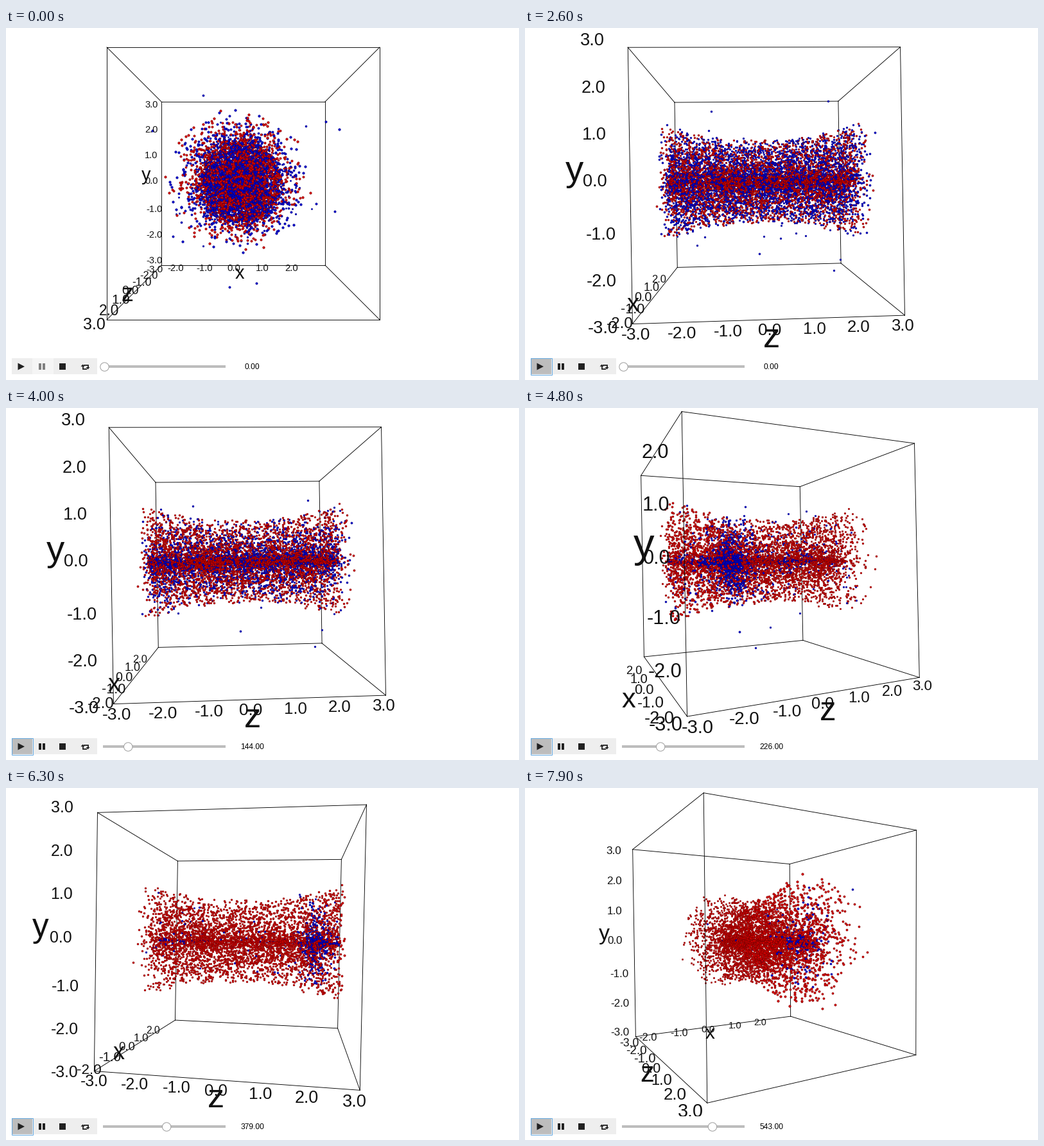
These frames come from a looping animation (799 by 549 pixels, 8 s). A matplotlib script:

```python
import itertools

import numpy as np
import matplotlib.pyplot as plt
from matplotlib.animation import FuncAnimation
from matplotlib.patches import Circle, Polygon, Rectangle

W, H, DPI = 799, 549, 100
STEP, FRAMES = 100, 80
PT = 72 / DPI                  # points per pixel
FOCAL, DIST = 637.5, 2.0
CX, CY = 369, 242
SLABS = 14
N = 4500
HALF_Z = 0.46
FONT = "Liberation Sans"
INK, DARK = "#111111", "#212121"

# Camera key poses: yaw, pitch, roll in degrees
FRONT = (0, 0, 0)
SIDE = (92.6, 0, 0.95)
POSES = {700: FRONT, 1200: (82, -0.7, 0.8), 1500: SIDE, 4450: SIDE,
         5300: (144.3, -0.9, 1.25), 6300: (81.4, 0.9, -1.05),
         7000: (70, 1, -0.6), 7900: (30, 1.5, 0.45)}


def smooth(x):
    x = np.clip(x, 0, 1)
    return x * x * (3 - 2 * x)


def counter(t):
    return round(np.interp(t, [2700, 4000, 7900], [0, 144, 543]))


# ---------- particles ----------
rng = np.random.default_rng(7)


def beam():
    u = rng.uniform(-1, 1, N)
    return u, 0.2 + 0.08 * u ** 2, rng.uniform(0, 1, N), \
        rng.uniform(0, 2 * np.pi, N)


def to_xyz(z, r, angle):
    return np.column_stack([r * np.cos(angle) - 0.02,
                            r * np.sin(angle) + 0.01, z])


red_u, red_limit, red_q, red_a = beam()
RED = to_xyz(red_u * HALF_Z, red_limit * red_q, red_a)
blue_u, blue_limit, blue_q, blue_a = beam()
strays = rng.uniform(0, 1, N) < 0.03
blue_limit[strays] *= rng.uniform(1.2, 1.9, strays.sum())
jitter = rng.normal(0, 0.028, N)


def blue_cloud(count):
    """Shrink to the axis, then bunch up and drift round the end of z."""
    late = max(count - 144, 0)
    r = blue_limit * blue_q ** (1 + min(count / 70, 3))
    z = HALF_Z * blue_u * np.abs(blue_u) ** (late / 25)
    z = z + jitter * smooth(late / 100) - 0.57 * smooth(late / 226)
    z = (z + HALF_Z) % (2 * HALF_Z) - HALF_Z
    return to_xyz(z, r, blue_a)[:int(N * np.exp(-late / 150))]


# ---------- camera ----------
def rotation(t):
    angles = [np.interp(t, list(POSES), a) for a in zip(*POSES.values())]
    ca, cp, cr = np.cos(np.radians(angles))
    sa, sp, sr = np.sin(np.radians(angles))
    ry = np.array([[ca, 0, sa], [0, 1, 0], [-sa, 0, ca]])
    rx = np.array([[1, 0, 0], [0, cp, -sp], [0, sp, cp]])
    rz = np.array([[cr, -sr, 0], [sr, cr, 0], [0, 0, 1]])
    return rz @ rx @ ry


def project(points, rot):
    cam = np.atleast_2d(points) @ rot.T
    depth = DIST - cam[:, 2]
    return (CX + FOCAL * cam[:, 0] / depth,
            CY - FOCAL * cam[:, 1] / depth, depth)


# ---------- stage ----------
fig = plt.figure(figsize=(W / 100, H / 100), dpi=DPI, facecolor="white")
ax = fig.add_axes([0, 0, 1, 1])
ax.set_xlim(-0.5, W - 0.5)
ax.set_ylim(H - 0.5, -0.5)
ax.axis("off")

corners = np.array(list(itertools.product((-0.5, 0.5), repeat=3)))
edges = [(i, j) for i, j in itertools.combinations(range(8), 2)
         if np.sum(corners[i] != corners[j]) == 1]
edge_lines = [ax.plot([], [], color="black", lw=0.9 * PT)[0] for _ in edges]


def dots(face, rim, z):
    return ax.plot([], [], "o", mfc=face, mec=rim, mew=0.6 * PT, zorder=z)[0]


# Depth slabs from far to near; the colour on top alternates.
slabs = []
for k in range(SLABS):
    z, flip = 2 + k / 50, k % 2 / 100
    slabs.append((dots("#dc0000", "#7c0000", z + flip),
                  dots("#0000d2", "#000084", z + 0.005)))
LIMITS = np.linspace(2.5, 1.5, SLABS - 1)

# Label: artist, position, size, shift, glyph middle in em.
# Size and shift are pixels at depth 1.
labels = []


def add_label(text, pos, size, shift, middle, z):
    art = ax.text(0, 0, text, family=FONT, color=INK, ha="center",
                  va="baseline", zorder=z, clip_on=True)
    labels.append((art, np.array(pos), size, shift, middle))


def add_tick(value, pos, shift):
    add_label(f"{value:.1f}", pos, 38, shift, 0.355, 5)


def add_name(text, pos, shift, middle=0.26):
    add_label(text, pos, 76, shift, middle, 5.1)


for v in range(-3, 4):
    add_tick(v, (-0.57, v / 6.2, -0.59), (5, 0) if v < 0 else (-7, -13))
    add_tick(v, (-0.543, -0.523, v / 6.2), (4 if v < 0 else -5, -2))
    if abs(v) < 3:
        add_tick(v, (0.181 * v - 0.041, -0.526, -0.555), (-12, 0))
add_name("x", (0, -0.575, -0.61), (-15, 0))
add_name("y", (-0.625, 0, -0.645), (-1, -24), 0.155)
add_name("z", (-0.565, -0.547, 0), (-1, -2))


# ---------- player bar ----------
def box(x, y, w, h, color, z=7, **kw):
    return ax.add_patch(Rectangle((x - 0.5, y - 0.5), w, h, fc=color,
                                  zorder=z, **{"lw": 0, **kw}))


def shape(points):
    ax.add_patch(Polygon(points, fc=DARK, lw=0, zorder=8))


box(0, 512, W, H - 512, "white", 6)
box(9, 515, 133, 25, "#eeeeee")
play = box(9, 515, 32, 25, "#eeeeee", 7.1)
focus = box(8.5, 514.5, 33, 26, "none", 7.2, ec="#64a8e0", lw=PT)
pause = box(41, 515, 33, 25, "#f5f5f5", 7.1)

shape([(18, 522), (18, 533), (28.5, 527.5)])
bars = [box(x, 523, 4, 10, DARK, 8) for x in (51, 57)]
box(83, 523, 10, 10, DARK, 8)
for s in (1, -1):
    ox, oy = 123, 528
    ax.plot([ox - 4 * s, ox - 4 * s, ox + 2.5 * s],
            [oy - 2 * s, oy + 3 * s, oy + 3 * s], color=DARK, lw=1.8 * PT,
            solid_joinstyle="miter", solid_capstyle="butt", zorder=8)
    shape([(ox - 7 * s, oy - 0.5 * s), (ox - s, oy - 0.5 * s),
           (ox - 4 * s, oy - 4 * s)])

box(151, 526, 191, 4, "#bdbdbd")
knob = ax.add_patch(Circle((153, 528), 6.7, fc="white", ec="#9e9e9e",
                           lw=PT, zorder=8))
readout = ax.text(383, 532, "", family=FONT, fontsize=12 * PT, color="black",
                  ha="center", va="baseline", zorder=8)


# ---------- drawing ----------
def draw_box(rot):
    x, y, depth = project(corners, rot)
    for line, (i, j) in zip(edge_lines, edges):
        line.set_data([x[i], x[j]], [y[i], y[j]])
        line.set_zorder(4 if depth[i] + depth[j] < 2 * DIST else 1)


def draw_cloud(points, rot, kind):
    x, y, depth = project(points, rot)
    layer = np.digitize(depth, LIMITS)
    for k, pair in enumerate(slabs):
        pick = layer == k
        pair[kind].set_data(x[pick], y[pick])
        pair[kind].set_markersize(5.2 / LIMITS[min(k, SLABS - 2)] * PT)


def draw_labels(rot):
    for art, pos, size, (dx, dy), middle in labels:
        x, y, depth = (v[0] for v in project(pos, rot))
        px = size / depth
        art.set_position((x + dx / depth, y + dy / depth + middle * px))
        art.set_fontsize(px * PT)


def draw_player(t, count):
    playing = t >= 2600
    shade = np.interp(t, [1800, 2100], [0.933, 0.741])
    play.set_facecolor((shade,) * 3)
    focus.set_visible(playing)
    pause.set_facecolor("#eeeeee" if playing else "#f5f5f5")
    for bar in bars:
        bar.set_facecolor(DARK if playing else "#808080")
    knob.center = (153 + 0.255 * count, 528)
    readout.set_text(f"{count:.2f}")


def update(i):
    t = i * STEP
    count = counter(t)
    rot = rotation(t)
    draw_box(rot)
    draw_cloud(RED, rot, 0)
    draw_cloud(blue_cloud(count), rot, 1)
    draw_labels(rot)
    draw_player(t, count)
    return []


anim = FuncAnimation(fig, update, frames=FRAMES, interval=STEP, repeat=True,
                     blit=False)
plt.show()
```
